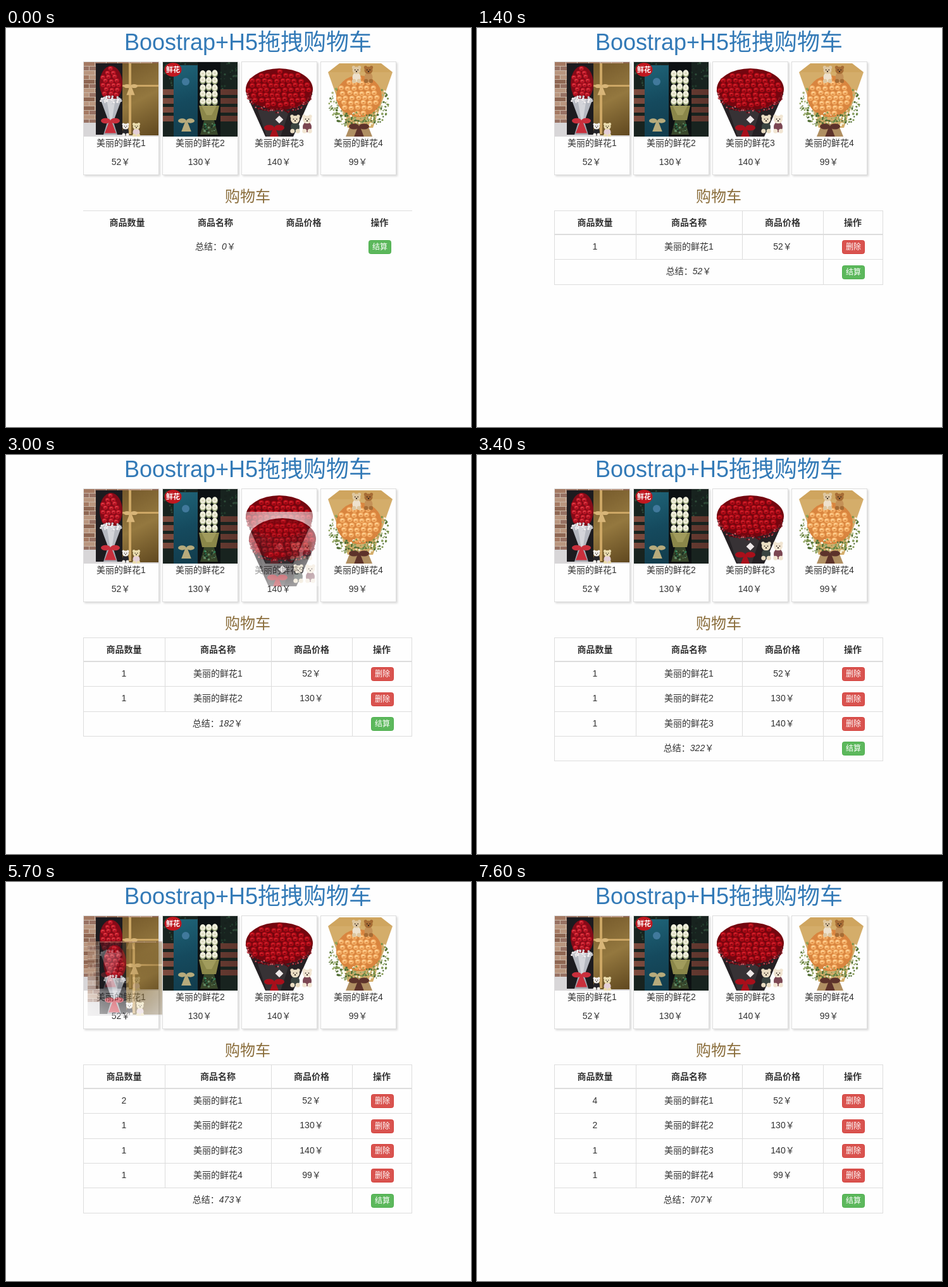
Write an HTML page with a canvas that moves like this. It is 735 px wide and 632 px high and loops after 8000 ms.

```html
<!DOCTYPE html>
<html lang="zh-CN">
<head>
<meta charset="utf-8">
<title>购物车</title>
<style>
html, body { margin: 0; width: 100%; height: 100%; overflow: hidden; background: #fefefe; }
canvas { display: block; }
</style>
</head>
<body>
<canvas id="stage" width="735" height="632"></canvas>
<script>
const ctx = document.getElementById('stage').getContext('2d');
const FAMILY = '"Liberation Sans", "Noto Sans CJK SC", "Noto Sans CJK", sans-serif';
const PAPER = '#fefefe', INK = '#333', LINE = '#ddd';
const LOOP = 8000, STEP = 100, SIZE = 118, ROW = 39.33;
const PRICES = [52, 130, 140, 99];
const HEADS = ['商品数量', '商品名称', '商品价格', '操作'];
const EMPTY_COLS = [122, 261, 401, 540, 641];
const FULL_COLS = [122, 251, 419, 547, 641];

// item, start time, visible steps, first position of the dragged copy
const DRAGS = [
  [0, 900, 5, 133, 113],
  [1, 2000, 4, 252, 154],
  [2, 3000, 4, 378, 90],
  [3, 4000, 3, 440, 198],
  [0, 5000, 2, 147, 212],
  [0, 5700, 3, 129, 94],
  [0, 6600, 2, 128, 138],
  [1, 7300, 3, 255, 189]
].map(([item, start, steps, x, y]) => ({ item, start, steps, x, y, drop: start + steps * STEP }));

const dropX = item => 155 + 95 * item - 10 * item * item;
const dropY = item => 260 + 20 * item;

let seed = 7;
function rnd(lo = 0, hi = 1) {
  seed = (seed * 16807) % 2147483647;
  return lo + (hi - lo) * seed / 2147483647;
}
const pick = list => list[Math.floor(rnd(0, list.length))];

// ---- drawing helpers ----
function rect(g, color, x, y, w, h) {
  g.fillStyle = color;
  g.fillRect(x, y, w, h);
}

function oval(g, color, x, y, rx, ry = rx) {
  g.fillStyle = color;
  g.beginPath();
  g.ellipse(x, y, rx, ry, 0, 0, Math.PI * 2);
  g.fill();
}

// Symmetric trapezoid, used for wrappers and ribbons.
function cone(g, color, cx, top, bottom, wTop, wBottom) {
  g.fillStyle = color;
  g.beginPath();
  g.moveTo(cx - wTop / 2, top);
  g.lineTo(cx + wTop / 2, top);
  g.lineTo(cx + wBottom / 2, bottom);
  g.lineTo(cx - wBottom / 2, bottom);
  g.fill();
}

function shade(g, x, y, w, h, ...colors) {
  const fill = g.createLinearGradient(x, y, x + w, y + h);
  colors.forEach((c, i) => fill.addColorStop(i / (colors.length - 1), c));
  rect(g, fill, x, y, w, h);
}

function text(g, str, x, y, size, color = INK, style = '') {
  g.font = `${style} ${size}px ${FAMILY}`;
  g.textAlign = 'center';
  g.fillStyle = color;
  g.fillText(str, x, y);
}

// Staggered blooms filling an ellipse, each with a dark rim and a small light fold.
function roses(g, cx, cy, rx, ry, r, [dark, mid, light]) {
  oval(g, dark, cx, cy, rx, ry);
  const nx = rx - r, ny = ry - r;
  for (let row = 0, y = -ny; y <= ny; y += r * 1.5, row++) {
    const half = nx * Math.sqrt(1 - (y / ny) ** 2);
    for (let x = -half + (row % 2) * r; x <= half; x += r * 1.9) {
      const px = cx + x + rnd(-1, 1), py = cy + y + rnd(-1, 1);
      oval(g, dark, px, py, r);
      oval(g, mid, px, py - r * 0.15, r * 0.85, r * 0.75);
      oval(g, light, px - r * 0.1, py - r * 0.3, r * 0.5, r * 0.35);
      oval(g, dark, px, py, r * 0.3, r * 0.18);
    }
  }
}

function specks(g, n, cx, cy, rx, ry, colors) {
  for (let i = 0; i < n; i++) {
    const a = rnd(0, Math.PI * 2), k = Math.sqrt(rnd());
    oval(g, pick(colors), cx + Math.cos(a) * rx * k, cy + Math.sin(a) * ry * k, rnd(0.8, 1.9));
  }
}

function bow(g, x, y, s, color) {
  cone(g, color, x, y, y + s * 1.3, s * 0.2, s * 1.2);
  for (const d of [-1, 1]) oval(g, color, x + d * s * 0.5, y, s * 0.5, s * 0.28);
}

function bear(g, x, y, s, fur, coat) {
  oval(g, coat, x, y + s * 1.7, s, s * 1.2);
  for (const d of [-1, 1]) {
    oval(g, fur, x + d * s * 0.7, y - s * 0.7, s * 0.4);
    oval(g, fur, x + d * s * 0.6, y + s * 2.6, s * 0.5);
  }
  oval(g, fur, x, y, s, s * 0.9);
  for (const d of [-1, 1]) oval(g, '#30241e', x + d * s * 0.35, y - s * 0.1, s * 0.13);
  oval(g, '#30241e', x, y + s * 0.3, s * 0.17);
}

// ---- product pictures ----
function redBox(g) {
  rect(g, '#cbb8a8', 0, 0, SIZE, SIZE);
  for (let y = 0; y < 96; y += 7) {
    for (let x = -(y % 2) * 9; x < SIZE; x += 18) {
      rect(g, pick(['#a57a63', '#8f6753', '#b9967f', '#987264']), x, y, 17, 6);
    }
  }
  rect(g, '#d8d6d8', 0, 96, SIZE, 22);
  rect(g, '#1c1b1f', 19, 2, 42, 113);
  shade(g, 61, 2, 57, 114, '#75592b', '#94783f', '#60481f');
  roses(g, 43, 34, 18, 28, 4.5, ['#850b18', '#bd1525', '#df3b45']);
  cone(g, '#b5b8c0', 43, 58, 92, 34, 9);
  cone(g, '#d4d5da', 43, 58, 92, 14, 3);
  specks(g, 50, 43, 60, 17, 6, ['#f4f0f1', '#c7c9cf']);
  cone(g, '#a5a8b0', 42, 92, 115, 8, 22);
  bow(g, 42, 93, 15, '#c92f3c');
  rect(g, '#cda765', 71, 2, 4, 112);
  rect(g, '#cda765', 61, 36, 57, 3);
  bow(g, 74, 38, 11, '#d8b578');
  bear(g, 66, 102, 5, '#f1eeea', '#25242a');
  bear(g, 83, 102, 5.5, '#eadcae', '#e4cfd7');
}

function whiteBox(g) {
  rect(g, '#18231f', 0, 0, SIZE, SIZE);
  specks(g, 200, 59, 18, 62, 30, ['#203b2b', '#2e4a38', '#17211d']);
  for (let y = 43; y < 95; y += 14) shade(g, 0, y, SIZE, 9, '#7d4b3e', '#5c342c');
  shade(g, 17, 5, 38, 113, '#1f6478', '#154a5e', '#123c4c');
  oval(g, '#41799c', 36, 31, 6);
  rect(g, '#0d1113', 55, 0, 36, SIZE);
  for (let i = 0; i < 15; i++) {
    const x = 63 + (i % 3) * 9.5, y = 18 + Math.floor(i / 3) * 11 + rnd(-1, 1);
    oval(g, '#9ba77b', x, y + 1, 4.8, 5.6);
    oval(g, '#f1efdd', x, y - 0.5, 4.3, 4.8);
    oval(g, '#d8d8b8', x, y, 1.8, 1.3);
  }
  cone(g, '#8b874a', 73, 69, 92, 32, 22);
  cone(g, '#a19c5d', 73, 69, 84, 24, 8);
  cone(g, '#38462a', 73, 92, 115, 16, 28);
  specks(g, 30, 73, 104, 11, 8, ['#2d7a52', '#648d68', '#1f3324']);
  bow(g, 37, 93, 13, '#b7ab7c');
  oval(g, '#c01820', 16, 12, 13.5, 11);
  text(g, '鲜花', 16, 16, 11, '#fff', 'bold');
}

function redBunch(g) {
  rect(g, PAPER, 0, 0, SIZE, SIZE);
  cone(g, '#252124', 59, 50, 118, 105, 44);
  cone(g, '#373235', 50, 76, 118, 50, 22);
  roses(g, 59, 43, 53, 33, 5, ['#74060f', '#ad0a16', '#d0202b']);
  for (let a = 0.2; a < 3; a += 0.03) {
    oval(g, pick(['#8f1721', '#cf5963', '#5a0a13']), 59 + 51 * Math.cos(a), 48 + 29 * Math.sin(a) + rnd(-4, 4), 1.3);
  }
  g.save();
  g.translate(59, 91);
  g.rotate(Math.PI / 4);
  rect(g, '#eee8e8', -4.5, -4.5, 9, 9);
  g.restore();
  bow(g, 51, 104, 16, '#a90f1b');
  bear(g, 84, 91, 7, '#e9dcc2', '#3a4440');
  bear(g, 103, 91, 7, '#f1e5d2', '#7b4652');
}

function peachBunch(g) {
  rect(g, PAPER, 0, 0, SIZE, SIZE);
  cone(g, '#cfa55f', 62, 2, 16, 66, 102);
  cone(g, '#d4ad6a', 62, 16, 104, 102, 40);
  specks(g, 420, 60, 66, 48, 37, ['#f3efd9', '#76904b', '#a9b682', '#526e35', '#8fa35c']);
  roses(g, 60, 54, 36, 33, 5.2, ['#d9853f', '#f3ad64', '#ffd092']);
  specks(g, 60, 60, 91, 38, 12, ['#fffbea', '#83994f', '#526e35']);
  cone(g, '#b08f62', 60, 98, 118, 26, 42);
  bow(g, 60, 102, 16, '#5d332b');
  bear(g, 56, 13, 6.5, '#dec7a1', '#eee1cd');
  bear(g, 75, 13, 6.5, '#a66c35', '#c49157');
}

function makeCanvas(paint) {
  const c = document.createElement('canvas');
  c.width = c.height = SIZE;
  paint(c.getContext('2d'));
  return c;
}

const pics = [redBox, whiteBox, redBunch, peachBunch].map(makeCanvas);

// Dragged copies fade out away from the pointer.
const ghosts = pics.map(pic => makeCanvas(g => {
  g.drawImage(pic, 0, 0);
  const fade = g.createRadialGradient(58, 46, 10, 58, 46, 92);
  fade.addColorStop(0, 'rgba(0,0,0,.85)');
  fade.addColorStop(1, 'rgba(0,0,0,.3)');
  g.globalCompositeOperation = 'destination-in';
  rect(g, fade, 0, 0, SIZE, SIZE);
}));

// ---- page ----
function card(i) {
  const x = 122 + i * 125;
  ctx.save();
  ctx.shadowColor = 'rgba(0,0,0,.14)';
  ctx.shadowOffsetX = ctx.shadowOffsetY = 2;
  ctx.shadowBlur = 3;
  rect(ctx, LINE, x, 53, 120, 180);
  ctx.restore();
  rect(ctx, PAPER, x + 1, 54, SIZE, 178);
  ctx.drawImage(pics[i], x + 1, 54);
  text(ctx, '美丽的鲜花' + (i + 1), x + 60, 187, 14);
  text(ctx, PRICES[i] + '￥', x + 59.5, 217, 14);
}

function button(label, mid, y, fill, edge) {
  const cx = Math.round(mid + 0.5);
  ctx.fillStyle = fill;
  ctx.strokeStyle = edge;
  ctx.lineWidth = 1;
  ctx.beginPath();
  ctx.roundRect(cx - 17.5, y + 0.5, 35, 21, 3);
  ctx.fill();
  ctx.stroke();
  text(ctx, label, cx, y + 15, 12, '#fff');
}

function total(sum, cx, y) {
  const parts = [['总结：', ''], [String(sum), 'italic'], ['￥', '']];
  const widths = parts.map(([s, style]) => {
    ctx.font = `${style} 14px ${FAMILY}`;
    return ctx.measureText(s).width;
  });
  let x = cx - widths.reduce((a, b) => a + b) / 2;
  parts.forEach(([s, style], i) => {
    text(ctx, s, x + widths[i] / 2, y, 14, INK, style);
    x += widths[i];
  });
}

function cart(counts) {
  const rows = [0, 1, 2, 3].filter(i => counts[i]);
  const n = rows.length;
  const cols = n ? FULL_COLS : EMPTY_COLS;
  const mid = HEADS.map((_, i) => (cols[i] + cols[i + 1]) / 2);
  const rowY = i => Math.round(327 + ROW * i);
  const baseline = i => Math.round(351 + ROW * i);
  const buttonY = i => Math.round(336.3 + ROW * i);

  rect(ctx, LINE, 122, 289, 520, 1);
  if (n) {
    rect(ctx, LINE, 122, 326, 520, 1);
    for (let i = 0; i <= n + 1; i++) rect(ctx, LINE, 122, rowY(i), 520, 1);
    cols.forEach((x, i) => {
      const inner = i === 1 || i === 2;
      rect(ctx, LINE, x, 289, 1, rowY(inner ? n : n + 1) - 289);
    });
  }
  HEADS.forEach((h, i) => text(ctx, h, mid[i], 313, 14, INK, 'bold'));
  rows.forEach((item, i) => {
    const cells = [counts[item], '美丽的鲜花' + (item + 1), PRICES[item] + '￥'];
    cells.forEach((c, k) => text(ctx, String(c), mid[k], baseline(i), 14));
    button('删除', mid[3], buttonY(i), '#d9534f', '#d43f3a');
  });
  const sum = counts.reduce((s, c, i) => s + c * PRICES[i], 0);
  total(sum, n ? (cols[0] + cols[3]) / 2 : mid[1], baseline(n));
  button('结算', mid[3], buttonY(n), '#5cb85c', '#4cae4c');
}

function ghost({ item, start, steps, x, y }, t) {
  const k = Math.floor((t - start) / STEP) / (steps - 1);
  const move = (a, b) => Math.round(a + (b - a) * k);
  ctx.drawImage(ghosts[item], move(x, dropX(item)), move(y, dropY(item)));
}

function draw(t) {
  rect(ctx, PAPER, 0, 0, 735, 632);
  text(ctx, 'Boostrap+H5拖拽购物车', 382.5, 35, 36, '#337ab7');
  PRICES.forEach((_, i) => card(i));
  text(ctx, '购物车', 382, 275, 24, '#8a6d3b');

  const counts = [0, 0, 0, 0];
  for (const d of DRAGS) if (t >= d.drop) counts[d.item]++;
  cart(counts);

  const active = DRAGS.find(d => t >= d.start && t < d.drop);
  if (active) ghost(active, t);
}

const began = performance.now();
function tick() {
  draw((performance.now() - began) % LOOP);
  requestAnimationFrame(tick);
}
tick();
</script>
</body>
</html>
```
